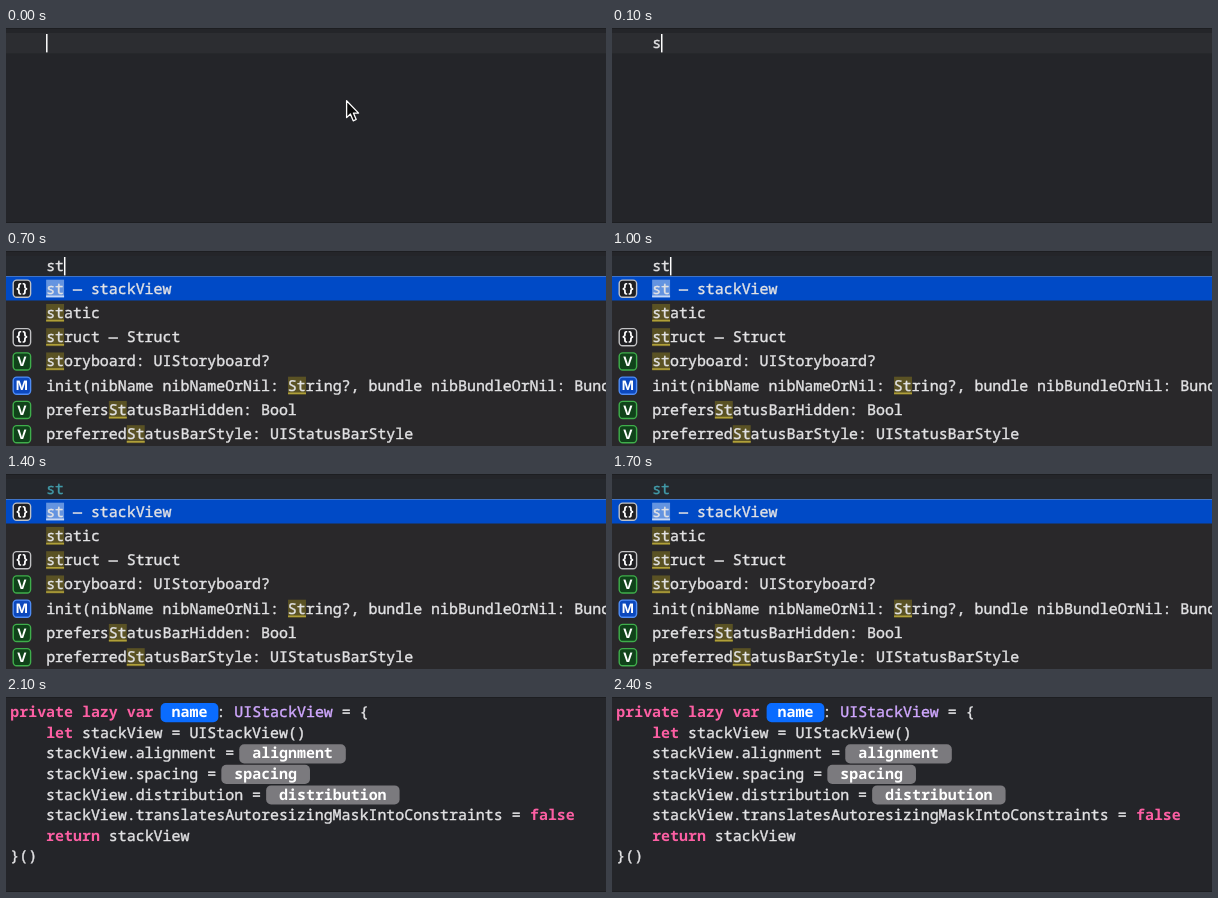
Animation, 600 px wide and 195 px high, one loop 2500 ms. Source, as an HTML page:

```html
<!DOCTYPE html>
<html lang="en">
<head>
<meta charset="utf-8">
<title>Code completion</title>
<style>
  html, body { margin: 0; width: 100%; height: 100%; overflow: hidden; background: #242529; }
  svg { display: block; width: 600px; height: 195px; }
  /* The thin stroke gives regular text a medium weight */
  text {
    font: 500 14.93px "Noto Sans Mono", "DejaVu Sans Mono", monospace;
    text-rendering: geometricPrecision;
    white-space: pre;
    color: #e2e2e4;
    fill: currentColor;
    stroke: currentColor;
    stroke-width: 0.4px;
  }
  .keyword { font-weight: 700; color: #fc5fa3; stroke: none; }
  .type { color: #d0a8ff; }
  .token { font-weight: 600; color: #fff; stroke: none; }
  .known { color: #429aa8; }
  .icon { font: 700 13px Inter, "Liberation Sans", sans-serif; text-anchor: middle; color: #fff; stroke: none; }
</style>
</head>
<body>
<svg id="stage" viewBox="0 0 600 195"></svg>
<script>
const LOOP = 2500;
const CELL = 8.96;      // advance of one character
const LEFT = 4.3;       // first code column
const INDENT = LEFT + 4 * CELL;
const BASE = 20.3;      // first baseline
const stage = document.getElementById('stage');

function add(parent, tag, attrs = {}, content = '') {
  const el = document.createElementNS('http://www.w3.org/2000/svg', tag);
  for (const key in attrs) el.setAttribute(key, attrs[key]);
  el.textContent = content;
  return parent.appendChild(el);
}

const group = () => add(stage, 'g');
const rect = (parent, x, y, width, height, fill, rx = 0) =>
  add(parent, 'rect', { x, y, width, height, fill, rx });
const write = (parent, x, y, str, cls = '') => add(parent, 'text', { x, y, class: cls }, str);

// Visible from one time to another, with hard switches
function show(el, from, to) {
  const at = (ms, opacity) => ({ offset: ms / LOOP, opacity, easing: 'step-end' });
  const frames = [];
  if (from > 0) frames.push(at(0, 0));
  frames.push(at(from, 1));
  if (to < LOOP) frames.push(at(to, 0));
  frames.push(at(LOOP, to < LOOP ? 0 : 1));
  el.animate(frames, { duration: LOOP, iterations: Infinity });
}

function typed(str, from, to, cls, caret = true) {
  const g = group();
  write(g, INDENT, BASE, str, cls);
  if (caret) rect(g, INDENT - 0.1 + str.length * CELL, 6, 1.5, 18.4, '#fff');
  show(g, from, to);
}

function drawEditor() {
  rect(stage, 0, 0, 600, 195, '#242529');
  rect(stage, 0, 0, 600, 1, '#1d1e21');
  rect(stage, 0, 194, 600, 1, '#1d1e21');
  const line = group();
  rect(line, 0, 5, 600, 20.4, '#2c2d31');
  show(line, 0, 1800);
}

function drawPointer() {
  const arrow = add(stage, 'path', {
    d: 'M340.6 72.8V89.6L344.4 86L347.2 92.8L350.2 91.5L347.4 85.1H352.6Z',
    fill: '#0b0b0b', stroke: '#fff', 'stroke-width': 1.3, 'stroke-linejoin': 'round'
  });
  show(arrow, 0, 100);
}

const ICONS = {
  '{}': ['#1f1f22', '#c2c2c4'],
  V: ['#10421a', '#3fae4b'],
  M: ['#0c48bd', '#4f8cf5']
};

function drawIcon(parent, kind, mid) {
  const [fill, stroke] = ICONS[kind];
  add(parent, 'rect', {
    x: 7.2, y: mid - 8.6, width: 17.4, height: 17.2, rx: 3.5, fill, stroke, 'stroke-width': 1.4
  });
  write(parent, 15.9, mid + (kind === '{}' ? 4.1 : 4.7), kind, 'icon');
}

function drawCompletions() {
  const rows = [
    ['{}', 'st — stackView', 0],
    ['', 'static', 0],
    ['{}', 'struct — Struct', 0],
    ['V', 'storyboard: UIStoryboard?', 0],
    ['M', 'init(nibName nibNameOrNil: String?, bundle nibBundleOrNil: Bundle?)', 27],
    ['V', 'prefersStatusBarHidden: Bool', 7],
    ['V', 'preferredStatusBarStyle: UIStatusBarStyle', 9]
  ];
  const g = group();
  rect(g, 0, 5, 600, 20.4, '#25282d');
  rect(g, 0, 25, 600, 170, '#29282a');
  rect(g, 0, 25, 600, 24.5, '#004ac6');
  rect(g, 0, 25, 600, 1, '#3f74c8');
  rows.forEach(([kind, label, match], i) => {
    const mid = 37.7 + i * 24.25;
    const x = INDENT + match * CELL;
    if (kind) drawIcon(g, kind, mid);
    rect(g, x, mid - 9, 2 * CELL, 18, i ? '#5a5224' : '#6494e0');
    rect(g, x, mid + 6.8, 2 * CELL, 1.6, i ? '#b0a03a' : '#c6d8f6');
    write(g, INDENT, mid + 5, label);
  });
  show(g, 700, 1800);
}

function drawToken(parent, column, y, label, color, pad) {
  const x = LEFT + column * CELL;
  rect(parent, x - pad, y - 14.2, (label.length + 2) * CELL + 2 * pad, 19.2, color, 5);
  write(parent, x + CELL, y, label, 'token');
}

function drawSnippet() {
  // Each run is [text, style]; the styles 'blue' and 'gray' are placeholders
  const property = name => [['    stackView.' + name + ' = '], [name, 'gray']];
  const lines = [
    [['private lazy var ', 'keyword'], ['name', 'blue'], [': '], ['UIStackView', 'type'], [' = {']],
    [['    '], ['let', 'keyword'], [' stackView = UIStackView()']],
    property('alignment'),
    property('spacing'),
    property('distribution'),
    [['    stackView.translatesAutoresizingMaskIntoConstraints = '], ['false', 'keyword']],
    [['    '], ['return', 'keyword'], [' stackView']],
    [['}()']]
  ];
  const g = group();
  lines.forEach((runs, i) => {
    const y = BASE + i * 20.57;
    let column = 0;
    for (const [str, style] of runs) {
      if (style === 'blue' || style === 'gray') {
        const blue = style === 'blue';
        drawToken(g, column, y, str, blue ? '#0a6cff' : '#7b7a7e', blue ? 2 : 4);
        column += str.length + 2;
      } else {
        write(g, LEFT + column * CELL, y, str, style);
        column += str.length;
      }
    }
  });
  show(g, 1800, LOOP);
}

drawEditor();
drawPointer();
drawCompletions();
typed('', 0, 100);
typed('s', 100, 600);
typed('st', 600, 1200);
typed('st', 1200, 1800, 'known', false);
drawSnippet();
</script>
</body>
</html>
```
